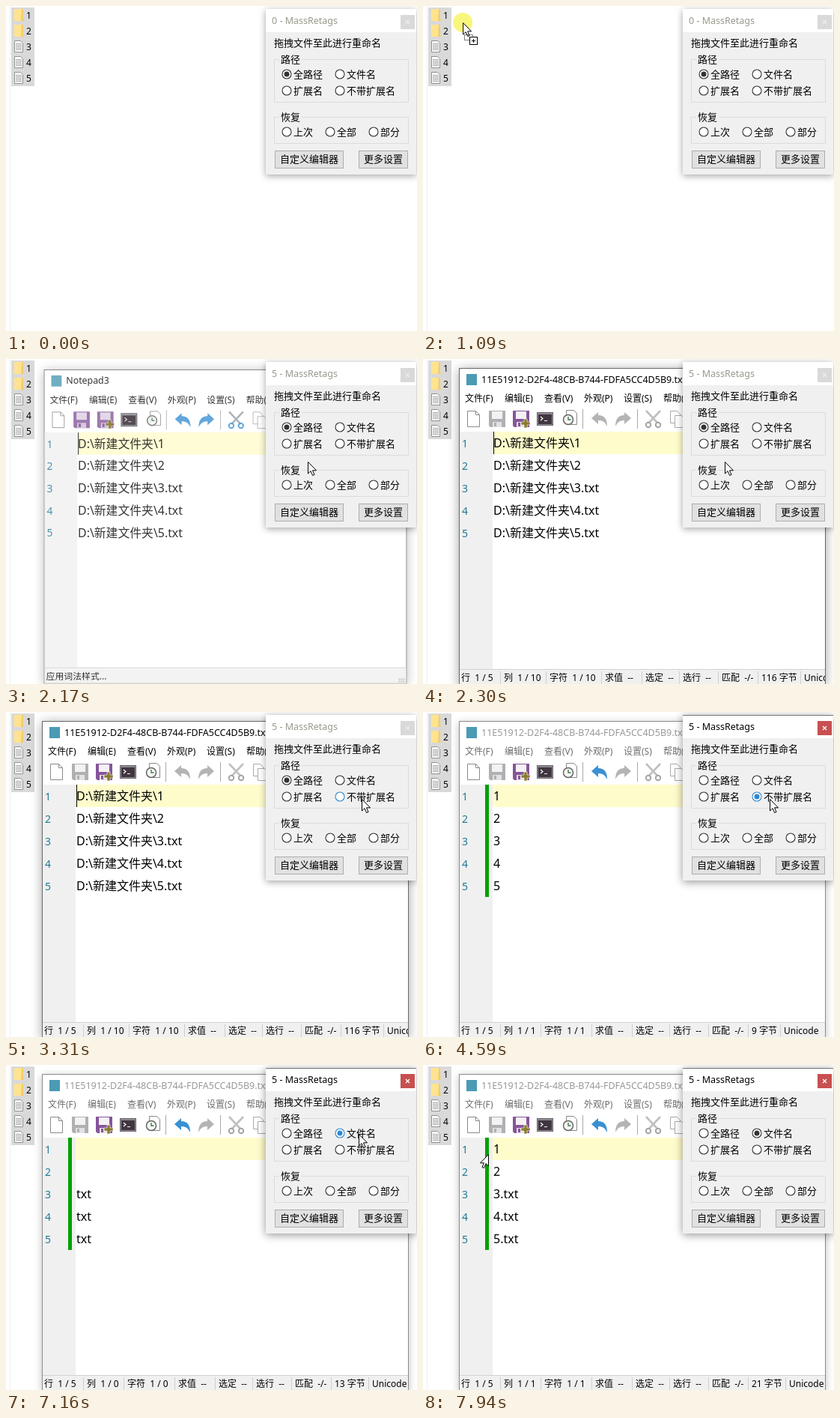
Recreate the animation shown at these times as an HTML page with a canvas. Size 549 px wide and 434 px high, loop 8 s.

```html
<!DOCTYPE html>
<html lang="zh-CN">
<meta charset="utf-8">
<style>
  html, body { margin: 0; width: 100%; height: 100%; overflow: hidden; background: #fff }
  canvas { display: block }
</style>
<canvas id="stage" width="549" height="434"></canvas>
<script>
const LOOP = 8000;
const ctx = document.getElementById('stage').getContext('2d');
const FONT = '"Noto Sans", "Noto Sans CJK SC", "Noto Sans CJK", sans-serif';
const FOLDER = 'D:\\新建文件夹\\';

// Pointer path: time, x, y
const POINTER = [
  [60, 461, 400], [570, 99, 123], [710, 99, 123], [930, 20, 15], [1000, 20, 15],
  [1530, 443, 105], [1560, 443, 105], [1690, 410, 117], [1890, 410, 117], [2130, 403, 137],
  [2490, 403, 137], [3100, 474, 115], [3280, 474, 115], [3310, 475, 116], [3600, 475, 116],
  [3860, 463, 116], [4590, 463, 116], [4720, 474, 115], [5100, 421, 109], [6200, 421, 109],
  [6550, 471, 92], [7230, 471, 92], [7560, 191, 165], [7640, 152, 145], [7670, 152, 145], [7940, 88, 119]
];
const PRESSES = [[950, 1560], [3510, 3600], [5270, 5360], [6850, 6940]];

// Document contents after each choice: start time, lines, size, column count
const DOCS = [
  [0, ['1', '2', '3.txt', '4.txt', '5.txt'].map(n => FOLDER + n), 116, 10],
  [4190, [''], 0, 0],
  [4240, ['1', '2', '3', '4', '5'], 9, 1],
  [5880, [''], 0, 0],
  [5930, ['', '', 'txt', 'txt', 'txt'], 13, 0],
  [7190, [''], 0, 0],
  [7240, ['1', '2', '3.txt', '4.txt', '5.txt'], 21, 1]
];
const CHOICES = [[0, 0], [3600, 3], [5360, 2], [6940, 1]];

// Radio buttons: x, y, label
const RADIOS = [
  [375, 91, '全路径'], [446, 91, '文件名'], [375, 113, '扩展名'], [446, 113, '不带扩展名'],
  [375, 168, '上次'], [433, 168, '全部'], [491, 168, '部分']
];

const latest = (list, t) => list.filter(item => item[0] <= t).pop();

function rect(x, y, w, h, fill, stroke) {
  if (fill) { ctx.fillStyle = fill; ctx.fillRect(x, y, w, h); }
  if (stroke) { ctx.strokeStyle = stroke; ctx.lineWidth = 1; ctx.strokeRect(x + .5, y + .5, w - 1, h - 1); }
}

function circle(x, y, r, fill, stroke, width = 1) {
  ctx.beginPath();
  ctx.arc(x, y, r, 0, 7);
  if (fill) { ctx.fillStyle = fill; ctx.fill(); }
  if (stroke) { ctx.strokeStyle = stroke; ctx.lineWidth = width; ctx.stroke(); }
}

function shape(d, x, y, fill, stroke, width = 1, flip = 1) {
  const path = new Path2D(d);
  ctx.save();
  ctx.translate(x, y);
  ctx.scale(flip, 1);
  if (fill) { ctx.fillStyle = fill; ctx.fill(path); }
  if (stroke) { ctx.strokeStyle = stroke; ctx.lineWidth = width; ctx.stroke(path); }
  ctx.restore();
}

// y is the middle of the line
function text(str, x, y, size = 13, color = '#000') {
  ctx.font = `${size}px ${FONT}`;
  ctx.fillStyle = color;
  ctx.fillText(str, x, y + size * .37);
}

function panel(x, y, w, h, fill, blur, opacity) {
  ctx.save();
  ctx.shadowColor = `rgba(0,0,0,${opacity})`;
  ctx.shadowBlur = blur;
  ctx.shadowOffsetY = 2;
  rect(x, y, w, h, fill);
  ctx.restore();
}

function pointerAt(t) {
  const i = POINTER.findIndex(p => p[0] > t);
  const [t1, x1, y1] = i < 0 ? POINTER[POINTER.length - 1] : POINTER[i];
  if (i <= 0) return { x: x1, y: y1 };
  const [t0, x0, y0] = POINTER[i - 1];
  const p = (t - t0) / (t1 - t0), e = p * p * (3 - 2 * p);
  return { x: x0 + (x1 - x0) * e, y: y0 + (y1 - y0) * e };
}

function drawFiles() {
  rect(5, 0, 1, 434, '#f0f0f0');
  rect(7, 2, 31, 105, '#d9d9d9');
  for (let i = 0; i < 5; i++) {
    const y = 4 + i * 21;
    if (i < 2) {
      rect(11, y, 12, 16, '#ffe391');
      shape('M10 0H12V13L13 16H9Z', 11, y, '#f3cd69');
    } else {
      shape('M.5.5H8.5L11.5 3.5V15.5H.5Z', 11, y, '#fff', '#909090');
      for (let k = 4; k < 14; k += 2) rect(13, y + k, 8, 1, '#a5a5a5');
    }
    text(i + 1, 27, y + 8.5, 12);
  }
}

function floppy(x, color) {
  shape('M0 0H22V22H2L0 20Z', x, 69, color);
  rect(x + 4, 70, 14, 10, '#f4f1f5');
  rect(x + 5, 84, 12, 7, '#e4e0e6');
  rect(x + 7, 85, 3, 5, color);
}

function drawToolbar(loaded, edited) {
  const purple = '#85559a', gray = '#b4b4b4', blue = '#3a90d2';
  shape('M.5.5H11.5L16.5 5.5V21.5H.5ZM11.5.5V5.5H16.5', 59, 69, '#fff', '#8a8a8a');
  floppy(88, loaded ? '#b0b0b3' : purple);
  floppy(120, purple);
  shape('M4 0H8V4H12V8H8V12H4V8H0V4H4Z', 131, 80, '#8a7a2e', '#fff', .6);
  rect(152, 71, 22, 18, '#8f8a92', '#6a646c');
  rect(154, 74, 18, 13, '#40363f');
  shape('M3 4L6 6.5L3 9M8 9.5H12', 154, 73, null, '#fff', 1.2);
  shape('M.5.5H10.5L14.5 4.5V19.5H.5Z', 191, 68, '#fff', '#888');
  circle(194, 81, 6.5, '#f6f6f6', '#666', 1.5);
  shape('M0-4V0H3.5', 194, 81, null, '#3c7d46', 1.4);
  rect(213, 67, 1, 26, '#a8a8a8');
  const arrow = 'M0 9L9 1V5C17 5 21 10 21 20C18 14 15 12 9 12V17Z';
  shape(arrow, 225, 70, loaded && !edited ? gray : blue);
  shape(arrow, 278, 70, loaded ? gray : blue, null, 1, -1);
  rect(286, 67, 1, 26, '#a8a8a8');
  const blade = loaded ? '#c0c0c0' : '#98a2aa', ring = loaded ? '#a5a5a5' : blue;
  shape('M1 1L16 17M20 1L5 17', 297, 68, null, blade, 2.6);
  circle(301, 88, 3.2, null, ring, 2);
  circle(314, 88, 3.2, null, ring, 2);
  for (const o of [0, 6]) shape('M.5.5H9.5L13.5 4.5V16.5H.5Z', 330 + o, 69 + o, '#fff', '#aaa');
}

function drawStatus(lines, bytes, columns, loaded) {
  rect(49, 414, 488, 22, '#f0f0f0');
  rect(49, 414, 488, 1, '#d2d2d2');
  if (!loaded) {
    text('应用词法样式...', 51, 426, 12);
    for (let i = 0; i < 6; i++) rect(533 - (i % 3) * 3, 432 - (i > 2) * 3, 2, 2, '#bbb');
    return;
  }
  const digits = String(columns).length - 1, size = String(bytes).length;
  const cells = [
    [`行  1 / ${lines}`, 57], [`列  1 / ${columns}`, 54 + 7 * digits], [`字符  1 / ${columns}`, 68 + 6 * digits],
    ['求值  --', 54], ['选定  --', 50], ['选行  --', 52], ['匹配  -/-', 53], [`${bytes} 字节`, 36 + 7 * size], ['Unicode', 60]
  ];
  ctx.save();
  ctx.beginPath();
  ctx.rect(49, 414, 488, 20);
  ctx.clip();
  let x = 51;
  for (const [label, width] of cells) {
    text(label, x, 426, 12);
    x += width;
    rect(x - 5, 417, 1, 17, '#cfcfcf');
  }
  ctx.restore();
}

function drawEditor(t) {
  if (t < 2060) return;
  const progress = Math.min(1, (t - 2060) / 210);
  const scale = 1 - .1 * (1 - progress) ** 3;
  const loaded = t >= 2300, active = t < 3510, edited = t >= 4190;
  const [, lines, bytes, columns] = latest(DOCS, t);
  const opacity = Math.min(1, progress * 1.5);
  ctx.save();
  ctx.translate(293, 200);
  ctx.scale(scale, scale);
  ctx.translate(-293, -200);

  panel(48, 12, 490, 424, '#fff', active ? 14 : 10, (active ? .36 : .25) * opacity);
  ctx.globalAlpha = opacity;
  rect(48, 12, 490, 424, '#fff', active ? '#686868' : '#8c8c8c');
  rect(58, 20, 14, 15, '#4a9bb4');
  const title = loaded ? '11E51912-D2F4-48CB-B744-FDFA5CC4D5B9.txt' : 'Notepad3';
  text(title, 78, 27, 12.5, active ? '#000' : '#999');
  ['文件(F)', '编辑(E)', '查看(V)', '外观(P)', '设置(S)', '帮助(H)'].forEach((item, i) =>
    text(item, 56 + i * 53, 53, 12, active ? '#000' : '#6d6d6d'));
  drawToolbar(loaded, edited);

  rect(49, 97, 44, 317, '#f0f0f0');
  rect(93, 97, 444, 30, '#fffccc');
  lines.forEach((line, i) => {
    const y = 112 + i * 30;
    text(i + 1, 52, y + .5, 14, '#1f7a96');
    if (edited) rect(83, y - 15, 5, 30, '#00a000');
    text(line, 94, y, 16);
  });
  if (active && (t < 2700 || t >= 3230)) rect(94, 97, 1, 30, '#000');
  drawStatus(lines.length, bytes, columns, loaded);
  ctx.restore();
}

function drawGroup(label, y, h) {
  rect(358, y, 180, h, null, '#dcdcdc');
  rect(365, y, 30, 1, '#f0f0f0');
  text(label, 367, y);
}

function drawButton(label, x, w) {
  rect(x, 193, w, 24, '#e1e1e1', '#adadad');
  text(label, x + (w - label.length * 13) / 2, 204.5);
}

function drawDialog(t, pointer) {
  const active = t >= 3510, chosen = latest(CHOICES, t)[1];
  panel(347, 4, 201, 221, '#f0f0f0', active ? 11 : 9, active ? .42 : .36);
  rect(347, 4, 201, 31, '#fff');
  if (active) rect(347, 4, 201, 1, '#777');
  text(`${t < 1890 ? 0 : 5} - MassRetags`, 355, 19.5, 12.5, active ? '#000' : '#98988c');
  rect(527, 12, 19, 19, active ? '#c75050' : '#d9d9d9');
  shape('M-2.5-2.5L2.5 2.5M2.5-2.5L-2.5 2.5', 536.5, 21.5, null, active ? '#fff' : '#eee', 1.3);
  text('拖拽文件至此进行重命名', 358, 49);
  drawGroup('路径', 71, 58);
  drawGroup('恢复', 148, 36);
  RADIOS.forEach(([x, y, label], i) => {
    const dx = pointer.x - x;
    const hover = t > 2300 && dx > -8 && dx < 9 + label.length * 13 && Math.abs(pointer.y - y) < 9;
    const color = hover ? '#3088cf' : '#333';
    circle(x, y, 6, '#fff', color, 1.1);
    if (i === chosen) circle(x, y, 3.5, color);
    text(label, x + 9, y);
  });
  drawButton('自定义编辑器', 359, 92);
  drawButton('更多设置', 471, 66);
}

function drawPointer(t, { x, y }) {
  if (t < 60) return;
  if (PRESSES.some(([from, to]) => t >= from && t < to)) circle(x, y, 13, 'rgba(245,240,40,.6)');
  const overEditor = t > 2300 && x < 347 && y > 97;
  if (overEditor && x > 93) {
    shape('M-3-8.5H-1L0-7.5L1-8.5H3M0-7.5V7.5M-3 8.5H-1L0 7.5L1 8.5H3', x, y, null, '#000');
    return;
  }
  shape('M.5.5V16L4 12.6L6.6 18.5L9 17.5L6.5 11.8H11.5Z', x, y, '#fff', '#000', 1, overEditor ? -1 : 1);
  if (t >= 1000 && t < 1560) {
    ctx.setLineDash([1, 1]);
    rect(Math.round(x) + 2, Math.round(y) + 16, 12, 8, null, '#000');
    ctx.setLineDash([]);
    rect(Math.round(x) + 9, Math.round(y) + 19, 11, 11, '#fff', '#000');
    shape('M3 5.5H8M5.5 3V8', Math.round(x) + 9, Math.round(y) + 19, null, '#000');
  }
}

function draw() {
  const t = performance.now() % LOOP;
  const pointer = pointerAt(t);
  rect(0, 0, 549, 434, '#fff');
  drawFiles();
  drawEditor(t);
  drawDialog(t, pointer);
  drawPointer(t, pointer);
  requestAnimationFrame(draw);
}
draw();
</script>
</html>
```
